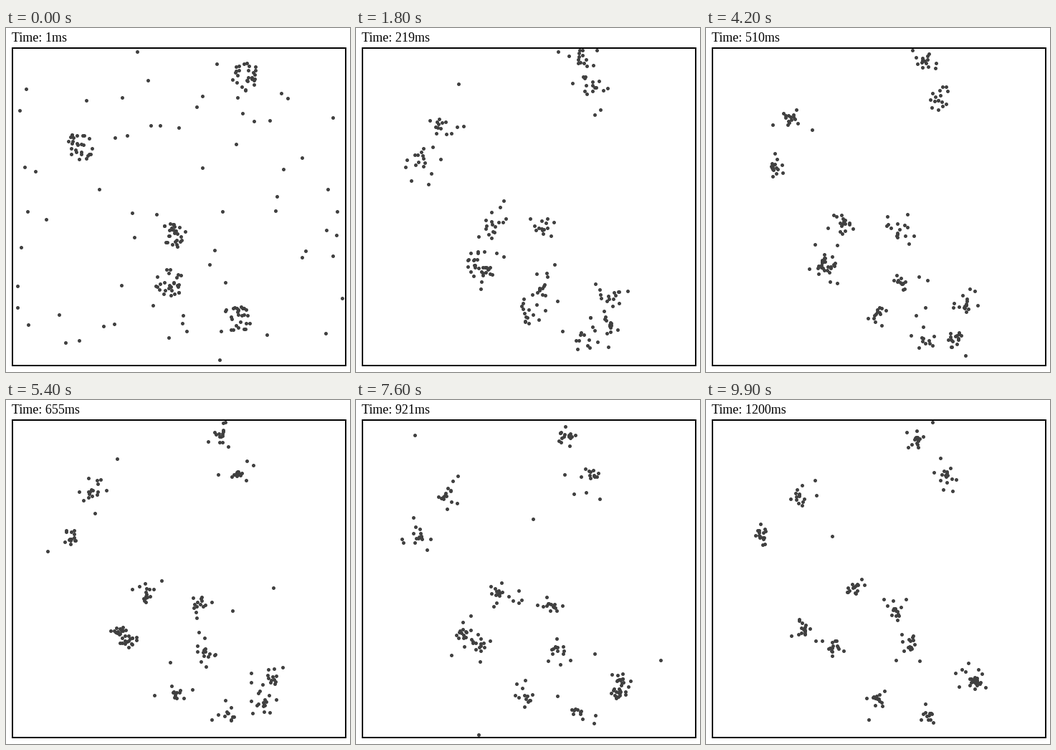
Recreate the animation shown at these times as a matplotlib script. Size 480 px wide and 480 px high, loop 10 s.

```python
import numpy as np
import matplotlib.pyplot as plt
from matplotlib.animation import FuncAnimation
from matplotlib.patches import Rectangle

SIZE, FRAMES, STEP = 480, 100, 100
PER_BLOB, BLOB_R, LONERS = 27, 20, 66
LOW, HIGH = (13, 30), (470, 467)
KEYS = (10, 42, 99)
rng = np.random.default_rng(7)

# Each starting blob, and the centres of the clusters it splits into.
BLOBS = {
    (333, 67): [[(318, 48), (302, 46), (289, 55)],
                [(330, 82), (320, 101), (333, 104)]],
    (101, 164): [[(115, 143), (118, 127), (131, 135)],
                 [(92, 182), (95, 191), (77, 186)]],
    (232, 290): [[(186, 275), (190, 270), (207, 260)],
                 [(255, 275), (270, 282), (266, 290)]],
    (226, 354): [[(180, 322), (162, 325), (136, 321)],
                 [(172, 343), (168, 335), (178, 345)],
                 [(252, 359), (272, 353), (285, 341)],
                 [(234, 385), (236, 405), (238, 419)]],
    (322, 403): [[(350, 376), (362, 387), (371, 388)],
                 [(316, 426), (306, 435), (311, 438)],
                 [(353, 405), (349, 431), (374, 393)]],
}
PATHS = np.array([path for paths in BLOBS.values() for path in paths])
PARENT = [b for b, paths in enumerate(BLOBS.values()) for _ in paths]


def noise(*shape, keep=0.85):
    """Smoothly wandering noise of unit variance along the first axis."""
    out = rng.standard_normal(shape)
    for k in range(1, shape[0]):
        out[k] = keep * out[k - 1] + np.sqrt(1 - keep ** 2) * out[k]
    return out


def disc(centre, n):
    r = BLOB_R * np.sqrt(rng.random(n))
    a = rng.uniform(0, 2 * np.pi, n)
    return centre + np.stack([r * np.cos(a), r * np.sin(a)], axis=1)


def scatter_loners():
    blobs, found = np.array(list(BLOBS)), []
    while len(found) < LONERS:
        p = rng.uniform(LOW, HIGH)
        if np.hypot(*(blobs - p).T).min() > 1.5 * BLOB_R:
            found.append(p)
    return np.array(found)


def choose_clusters(loners):
    home = []
    for b in range(len(BLOBS)):
        mine = [i for i, parent in enumerate(PARENT) if parent == b]
        home += [mine[k % len(mine)] for k in range(PER_BLOB)]
    size = -(-(len(home) + LONERS) // len(PATHS))
    room = size - np.bincount(home)
    for p in loners:
        dist = np.hypot(*(PATHS[:, 0] - p).T)
        best = int(np.argmin(np.where(room > 0, dist, np.inf)))
        room[best] -= 1
        home.append(best)
    return home


def centres(t):
    return np.stack([[np.interp(t, KEYS, axis) for axis in path.T]
                     for path in PATHS]).transpose(2, 0, 1)


def add_strays(pos):
    """Throw single dots far out for a few frames at a time."""
    for t in rng.integers(3, FRAMES, FRAMES):
        dot, place = rng.integers(pos.shape[1]), rng.uniform(LOW, HIGH)
        drift = rng.normal(0, 9, 2)
        for k in range(t - 1, min(FRAMES, t + 2)):
            pos[k, dot] = place + (k - t) * drift


def simulate():
    loners = scatter_loners()
    start = np.vstack([disc(b, PER_BLOB) for b in BLOBS] + [loners])
    n, t = len(start), np.arange(FRAMES)
    home = centres(t)[:, choose_clusters(loners)]
    spread = 6.5 + 7.5 * np.exp(-t / 25)
    reach = spread[:, None, None] * np.exp(0.5 * noise(FRAMES, n, 1))
    settled = home + reach * noise(FRAMES, n, 2)
    arrive = rng.uniform(4, 10, n)
    away = np.clip(1 - t[:, None] / arrive, 0, 1)[..., None]
    pos = away * start + (1 - away) * settled
    add_strays(pos)
    return np.clip(np.rint(pos), LOW, HIGH) + 0.5


dots = simulate()
clock = np.rint(np.linspace(1, 1200, FRAMES)).astype(int)

# At 72 dpi one point is one pixel.
fig = plt.figure(figsize=(SIZE / 72, SIZE / 72), dpi=72, facecolor="white")
ax = fig.add_axes([0, 0, 1, 1])
ax.set(xlim=(0, SIZE), ylim=(SIZE, 0))
ax.axis("off")
ax.add_patch(Rectangle((9, 28), 465, 443, fill=False, ec="black", lw=2))
marks = ax.scatter(*dots[0].T, s=25, c="#404040", linewidths=0,
                   antialiased=False)
label = ax.text(8, 19, "", family="Liberation Serif", size=18,
                color="black", va="baseline")


def update(k):
    marks.set_offsets(dots[k])
    label.set_text(f"Time: {clock[k]}ms")
    return marks, label


anim = FuncAnimation(fig, update, frames=FRAMES, interval=STEP,
                     repeat=True, repeat_delay=0, blit=False)
plt.show()
```
